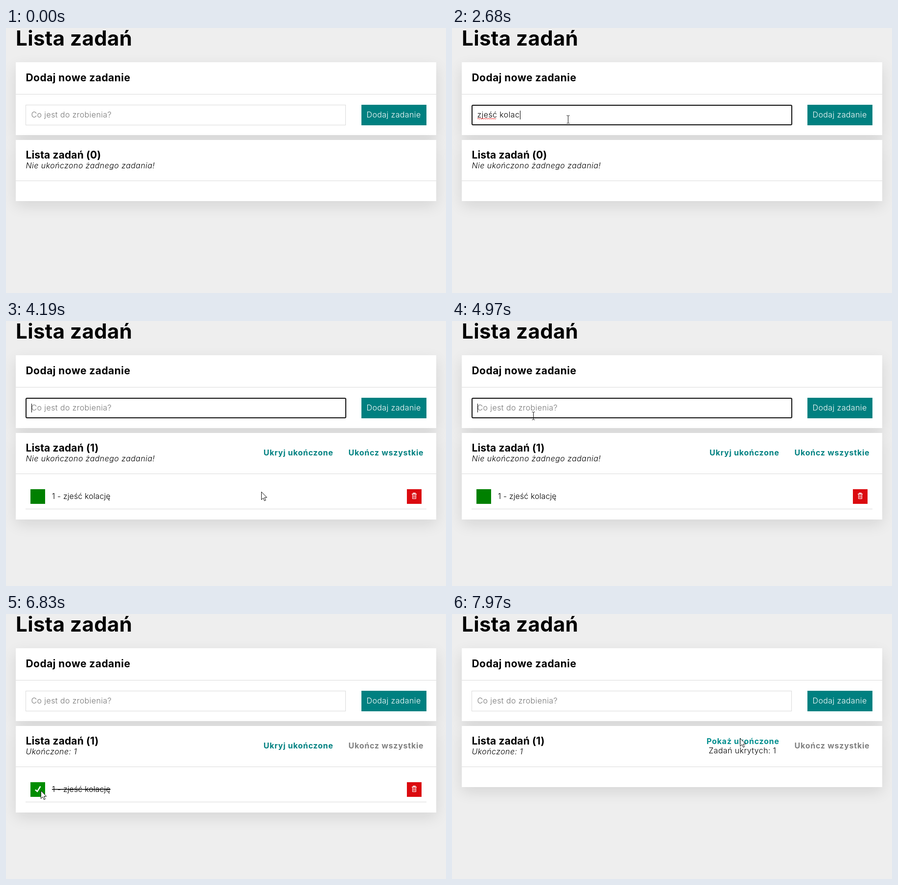
These frames come from a looping animation (900x542 px, 8000 ms). An HTML page:

```html
<!DOCTYPE html>
<html lang="pl">
<head>
<meta charset="utf-8">
<title>Lista zadań</title>
<style>
  html, body { margin: 0; width: 100%; height: 100%; overflow: hidden; background: #eee; }
  svg { display: block; width: 100%; height: 100%; }
  text { font: 300 16px Inter, "Open Sans", sans-serif; font-optical-sizing: none; letter-spacing: .4px; white-space: pre; }
  .h1 { font-size: 42px; font-weight: 700; }
  .h2 { font-size: 21px; font-weight: 700; letter-spacing: .12px; }
  .link { font-weight: 700; letter-spacing: .75px; }
  .note { font-style: italic; letter-spacing: .45px; }
  .item { letter-spacing: .1px; }
  .rule { stroke: #dadada; }
  .shade { opacity: .1; filter: url(#blur); }
</style>
</head>
<body>
<svg viewBox="0 0 900 542">
  <defs>
    <filter id="blur" filterUnits="userSpaceOnUse" x="-60" y="0" width="1020" height="542">
      <feGaussianBlur stdDeviation="15"/>
    </filter>
  </defs>
  <rect width="900" height="542" fill="#eee"/>
  <text class="h1" x="20" y="36">Lista zadań</text>

  <rect class="shade" x="20" y="80" width="860" height="149"/>
  <rect x="20" y="70" width="860" height="149" fill="#fff"/>
  <rect id="shade" class="shade" x="20" y="239" width="860"/>
  <rect id="card" x="20" y="229" width="860" fill="#fff"/>

  <text class="h2" x="40.500" y="109" style="letter-spacing:.45px">Dodaj nowe zadanie</text>
  <path class="rule" d="M20 135.500H880M20 312.500H880"/>
  <rect id="field" fill="#fff"/>
  <text id="hint" x="51.500" y="183" fill="#757575">Co jest do zrobienia?</text>
  <text id="typed" x="51.500" y="183"></text>
  <path id="wave" fill="none" stroke="#f00"/>
  <path id="caret" stroke="#000"/>
  <rect id="add" x="727" y="157" width="133" height="42"/>
  <text x="737.500" y="183" fill="#fff">Dodaj zadanie</text>

  <text id="title" class="h2" x="40.500" y="267"></text>
  <text id="note" class="note" x="40.500" y="287"></text>
  <g id="links">
    <text id="toggle" class="link" x="669.500" text-anchor="end"></text>
    <text id="hidden" x="525" y="285">Zadań ukrytych: 1</text>
    <text id="all" class="link" x="700.500" y="275">Ukończ wszystkie</text>
  </g>
  <g id="row">
    <rect id="check" x="50" y="344" width="30" height="30"/>
    <path id="tick" d="M60 359.500L64 363L70.500 352.500" fill="none" stroke="#fff" stroke-width="2.400"/>
    <text id="task" class="item" x="94" y="364">1 - zjeść kolację</text>
    <rect x="820" y="344" width="30" height="30" fill="#db0a0f"/>
    <g fill="none" stroke="#fff">
      <path d="M830 354H840M833 353V352H837V353" stroke-width="1.500"/>
      <path d="M831.500 355V363.500H838.500V355M833.700 356V362M836.300 356V362"/>
    </g>
    <path class="rule" d="M40 384.500H860"/>
  </g>

  <path id="arrow" d="M.5 .5V16.500L4.200 13L6.700 18.700L9.200 17.600L6.800 12H11.700Z" fill="#fff" stroke="#111"/>
  <path id="beam" d="M-3 -8H-1L0 -7L1 -8H3M0 -7V7M-3 8H-1L0 7L1 8H3" fill="none" stroke="#111"/>
</svg>
<script>
const LOOP = 8000, STEP = 60;
const WORDS = "zjeść kolację";
const FOCUS = 660, ADD = 3930, DONE = 6590, HIDE = 7610, HOVER = 7910;
const TEAL = "#008080", TEAL_HOVER = "#008d8d";

// Where the pointer slows down: time, x, y of its hot spot.
const STOPS = [
  [60, 300, 283], [720, 237, 187], [3470, 237, 187], [3770, 578, 138],
  [3930, 738, 168], [4430, 330, 510], [4970, 166, 194], [5570, 145, 395],
  [5930, 60, 362], [6290, 57, 351], [6830, 71, 361], [7610, 592, 262], [7970, 589, 254]
];

const el = {};
document.querySelectorAll("[id]").forEach(n => el[n.id] = n);

const set = (node, attrs) => {
  for (const k in attrs) node.setAttribute(k, attrs[k]);
};
const show = (node, on) => node.setAttribute("visibility", on ? "visible" : "hidden");
const within = (p, x, y, w, h) => p.x >= x && p.x < x + w && p.y >= y && p.y < y + h;
const smooth = k => k * k * (3 - 2 * k);

let zigzag = "M52 186";
for (let x = 54; x <= 91; x += 2) zigzag += `L${x} ${x % 4 ? 184.5 : 186.5}`;
set(el.wave, { d: zigzag });

// Steady typing that speeds up and slows down in two bursts.
const keyTime = i => 1035 + 164 * i - 50 * Math.cos((i - 2) * 2 * Math.PI / 7);

function pointer(time) {
  const t = Math.floor((time - 50) / STEP) * STEP + 50;
  const i = STOPS.findIndex(s => s[0] >= t);
  const b = STOPS[i < 0 ? STOPS.length - 1 : i];
  const a = i > 0 ? STOPS[i - 1] : b;
  const k = a === b ? 1 : smooth((t - a[0]) / (b[0] - a[0]));
  return {
    x: Math.round(a[1] + (b[1] - a[1]) * k),
    y: Math.round(a[2] + (b[2] - a[2]) * k)
  };
}

function drawField(t) {
  const focused = t >= FOCUS && t < DONE;
  let count = 0;
  while (count < WORDS.length && keyTime(count) <= t) count++;
  const text = t < ADD ? WORDS.slice(0, count) : "";
  el.typed.textContent = text;
  show(el.hint, !text);
  show(el.wave, text.length > 5);
  set(el.field, focused
    ? { x: 41, y: 158, width: 654, height: 40, rx: 2, stroke: "#101010", "stroke-width": 2 }
    : { x: 40.5, y: 157.5, width: 654, height: 41, rx: 0, stroke: "#dadada", "stroke-width": 1 });

  const since = t >= ADD ? ADD : count ? keyTime(count - 1) : FOCUS;
  show(el.caret, focused && (t - since) % 1000 < 500);
  const end = text ? el.typed.getComputedTextLength() : 0;
  set(el.caret, { d: `M${Math.round(52 + end) + .5} 169V187` });
}

function drawList(t, p) {
  const added = t >= ADD, done = t >= DONE, hidden = t >= HIDE;
  const open = added && !hidden;
  const height = open ? 177 : 125;
  set(el.card, { height });
  set(el.shade, { height });
  el.title.textContent = `Lista zadań (${added ? 1 : 0})`;
  el.note.textContent = done ? "Ukończone: 1" : "Nie ukończono żadnego zadania!";

  show(el.links, added);
  el.hidden.style.display = hidden ? "" : "none";
  el.toggle.textContent = hidden ? "Pokaż ukończone" : "Ukryj ukończone";
  const lit = hidden ? t >= HOVER : within(p, 520, 260, 150, 20);
  set(el.toggle, { y: hidden ? 266 : 275, fill: lit ? TEAL_HOVER : TEAL });
  set(el.all, { fill: done ? "#808080" : TEAL });

  el.row.style.display = open ? "" : "none";
  set(el.check, { fill: within(p, 50, 344, 30, 30) ? "#008d00" : "#008000" });
  show(el.tick, done);
  el.task.style.textDecoration = done ? "line-through" : "none";
}

function render(t) {
  const p = pointer(t);
  drawField(t);
  drawList(t, p);
  set(el.add, { fill: within(p, 727, 157, 133, 42) ? TEAL_HOVER : TEAL });

  const beam = within(p, 40, 157, 656, 42);
  show(el.arrow, t >= STEP && !beam);
  show(el.beam, t >= STEP && beam);
  set(el.arrow, { transform: `translate(${p.x} ${p.y})` });
  set(el.beam, { transform: `translate(${p.x + .5} ${p.y})` });
}

const start = performance.now();
function tick() {
  render((performance.now() - start) % LOOP);
  requestAnimationFrame(tick);
}
tick();
</script>
</body>
</html>
```
